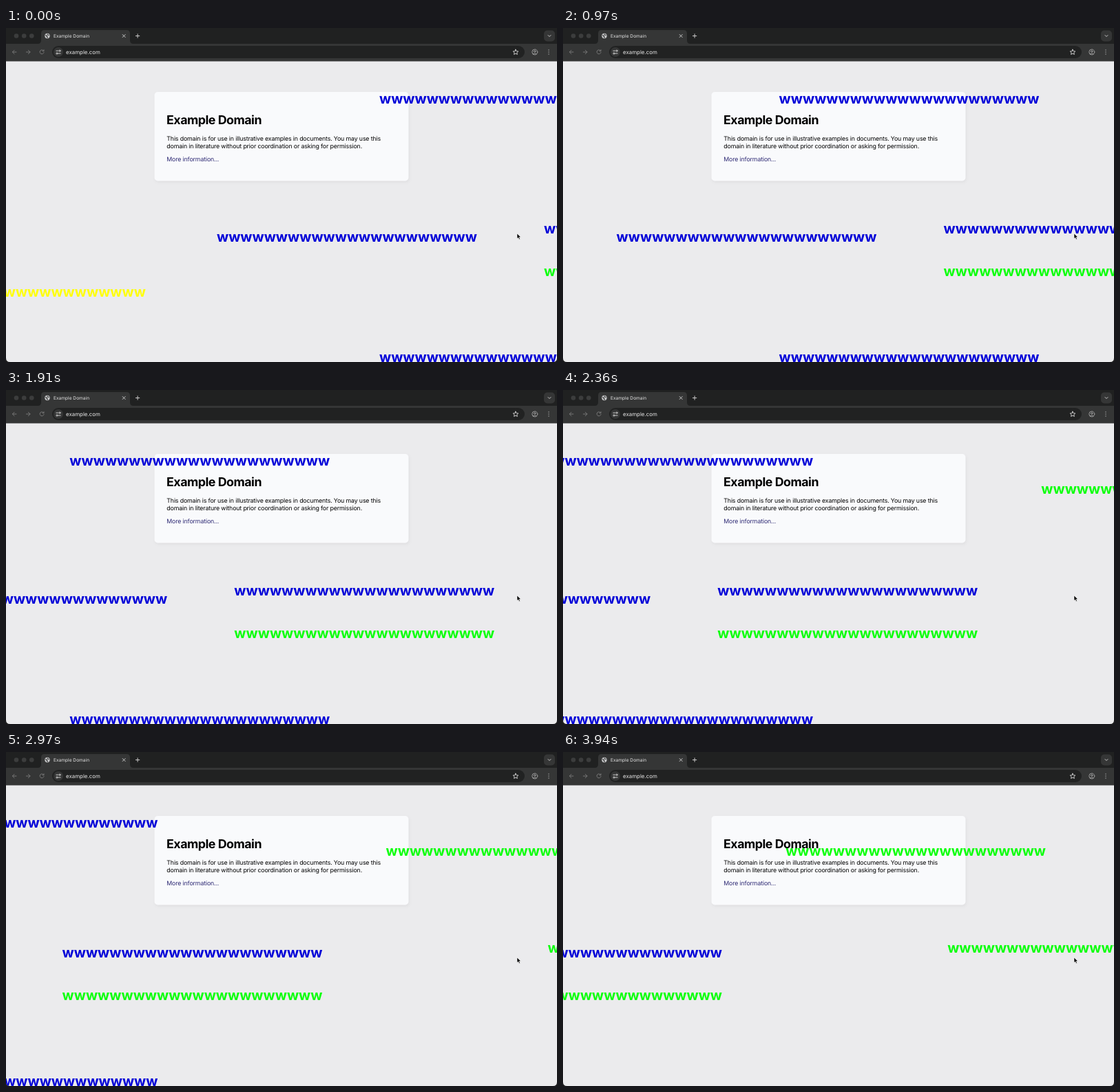
An HTML page for the animation above (3970 ms loop, 800 by 486 pixels).

```html
<!DOCTYPE html>
<html lang="en">
<head>
<meta charset="utf-8">
<title>Example Domain</title>
<style>
html, body { margin: 0; width: 100%; height: 100%; overflow: hidden; background: #1c1c1c; }
svg { display: block; width: 800px; height: 486px; }
text { font-family: Inter, "Open Sans", sans-serif; text-rendering: geometricPrecision; }
.icon { fill: none; stroke: #c8c8c8; stroke-width: 1; stroke-linecap: round; stroke-linejoin: round; }
.dim { stroke: #777; }
.body { font-size: 8.8px; letter-spacing: -.15px; }
#rows { font-size: 22px; font-weight: 700; }
</style>
</head>
<body>
<svg viewBox="0 0 800 486">
  <!-- tab strip -->
  <rect width="800" height="30" fill="#202121"/>
  <g fill="#3c3d3d"><circle cx="15" cy="11.5" r="3.3"/><circle cx="26.2" cy="11.5" r="3.3"/><circle cx="37.3" cy="11.5" r="3.3"/></g>
  <path d="M46 23q5 0 5-5V8q0-5 5-5h119q5 0 5 5v10q0 5 5 5z" fill="#353636"/>
  <circle cx="60" cy="11.5" r="3.7" fill="#c3c4c5"/>
  <path d="M57.3 10.5l2.2 1.2v1.5l1.4 1M60.3 8.4v1.4l2.3 .8" fill="none" stroke="#353636" stroke-width="1.1"/>
  <text x="69" y="13.7" font-size="6.6" fill="#e3e3e3">Example Domain</text>
  <path class="icon" d="M169.2 9.5l4 4m0-4l-4 4M188.4 11.5h5.4m-2.7-2.7v5.4"/>
  <rect x="781" y="3.5" width="16" height="16" rx="5" fill="#353636"/>
  <path class="icon" d="M787 10.5l2 2 2-2"/>

  <!-- toolbar -->
  <rect y="23" width="800" height="26" fill="#353636"/>
  <path class="icon dim" d="M15 35h-5.5m2.6-2.7L9.4 35l2.7 2.7M29.5 35H35m-2.6-2.7L35.1 35l-2.7 2.7M54.7 33.2a3 3 0 1 0 .4 2.3M55 31.7v1.9h-1.9"/>
  <rect x="67" y="26" width="686" height="18" rx="9" fill="#212222"/>
  <circle cx="76" cy="35" r="7" fill="#353636"/>
  <g class="icon"><path d="M72.8 33.2h3M76.2 37h3"/><circle cx="78" cy="33.2" r="1.1"/><circle cx="74" cy="37" r="1.1"/></g>
  <text x="87" y="37.8" font-size="7.9" fill="#e6e6e6">example.com</text>
  <path class="icon" d="M740 31.2l1.1 2.5 2.7.3-2 1.8.6 2.7-2.4-1.4-2.4 1.4.6-2.7-2-1.8 2.7-.3z" stroke-width=".9"/>
  <g class="icon" style="stroke:#999"><circle cx="767.8" cy="35" r="4"/><circle cx="767.8" cy="34" r="1.3"/><path d="M765.3 37.8q2.5-2 5 0"/></g>
  <g fill="#999"><circle cx="788" cy="32" r=".8"/><circle cx="788" cy="35" r=".8"/><circle cx="788" cy="38" r=".8"/></g>

  <!-- page -->
  <clipPath id="page"><path d="M0 48.5h800v431.5q0 6-6 6H6q-6 0-6-6z"/></clipPath>
  <g clip-path="url(#page)">
    <rect y="48" width="800" height="438" fill="#ebebed"/>
    <rect x="215.5" y="93" width="369" height="129.5" rx="5" fill="#f9fafc" style="filter:drop-shadow(1px 2px 2px rgba(0,0,0,.05))"/>
    <text x="233" y="139.6" font-size="17.8" font-weight="700" letter-spacing="-.47">Example Domain</text>
    <text class="body" x="233.3" y="164">This domain is for use in illustrative examples in documents. You may use this</text>
    <text class="body" x="233.3" y="174.8">domain in literature without prior coordination or asking for permission.</text>
    <text class="body" x="233.3" y="194" fill="#2e2a74">More information...</text>
    <g id="rows"></g>
  </g>
  <path d="M742 299v7.6l1.8-1.6 1.2 2.8 1.4-.6-1.2-2.7h2.4z" fill="#000" stroke="#fff" stroke-width=".6"/>
</svg>
<script>
const LOOP = 3970, STEP = LOOP / 131, SPEED = 0.2355, ROW_WIDTH = 378;
const BLUE = '#0000d8', GREEN = '#0cff0c', YELLOW = '#ffff0a';
const group = document.getElementById('rows');

// left edge at time zero, baseline, colour
const rows = [
  [542, 110, BLUE], [306, 310.5, BLUE], [781, 299, BLUE], [781, 360.5, GREEN],
  [-175, 390.5, YELLOW], [542, 485.5, BLUE], [1251, 150.5, GREEN], [1486, 292, GREEN]
].map(([x, y, fill]) => {
  const el = document.createElementNS('http://www.w3.org/2000/svg', 'text');
  el.textContent = 'w'.repeat(22);
  el.setAttribute('y', y);
  el.setAttribute('fill', fill);
  group.append(el);
  return { el, x };
});

// one font size for all rows, from the natural width of the letters
group.style.fontSize = 22 * ROW_WIDTH / rows[0].el.getComputedTextLength() + 'px';

const start = performance.now();
function draw() {
  const elapsed = (performance.now() - start) % LOOP;
  // steps fall on the nearest 10 ms, so one may begin up to 5 ms early
  const t = Math.floor((elapsed + 5) / STEP) * STEP;
  for (const { el, x } of rows) el.setAttribute('x', x - SPEED * t);
  requestAnimationFrame(draw);
}
draw();
</script>
</body>
</html>
```
